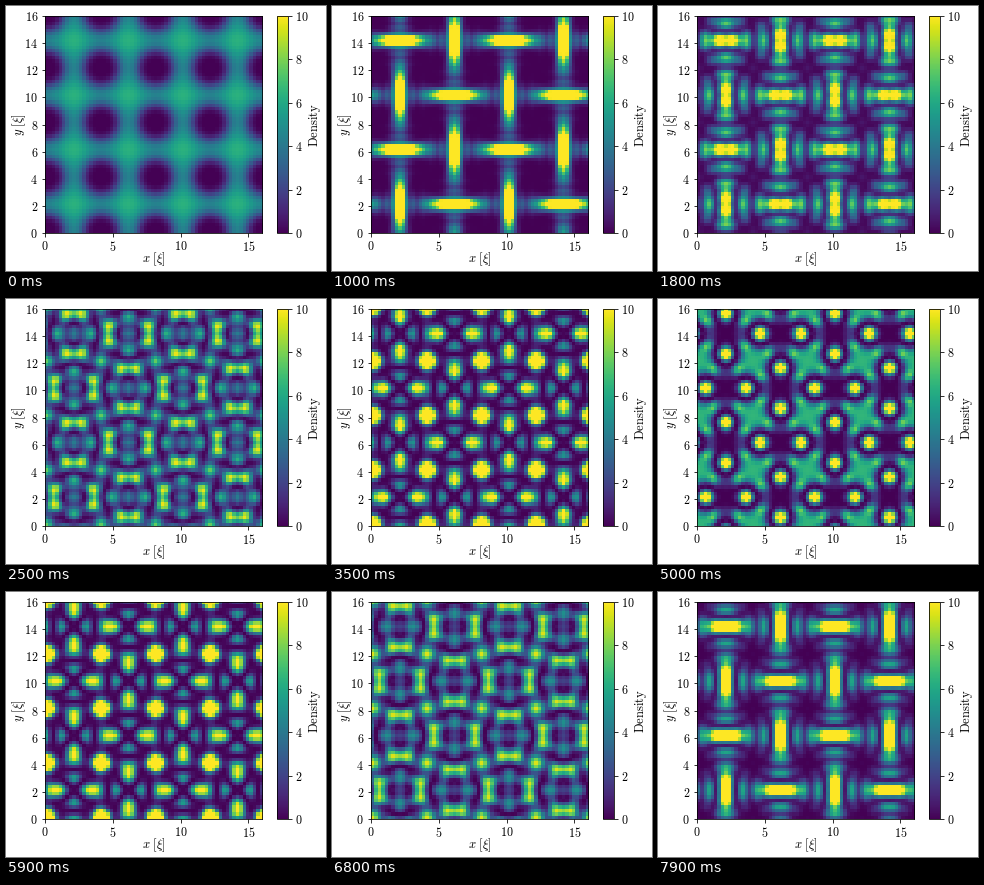
Write a matplotlib script that moves like this. It is 320 px wide and 265 px high and loops after 8000 ms.

```python
import numpy as np
import matplotlib.pyplot as plt
from matplotlib.animation import FuncAnimation

WIDTH, HEIGHT, DPI = 320, 265, 72
FRAMES, INTERVAL = 80, 100
SIZE, CELLS = 16, 64
SPACING, CHARGE = 4, 4
TIME_STEP = 0.0536

plt.rcParams.update({
    "mathtext.fontset": "cm",
    "font.family": "DejaVu Serif",
    "font.size": 12,
})


def vortex_lattice(x, y):
    """Square lattice of alternating, multiply charged vortices."""
    profile = np.ones_like(x)
    sites = np.arange(-SPACING, SIZE + SPACING + 1, SPACING)
    for cx in sites:
        for cy in sites:
            profile *= np.tanh(np.hypot(x - cx, y - cy))
    angle = np.arctan2(np.sin(np.pi * y / SPACING), np.sin(np.pi * x / SPACING))
    return np.sqrt(8) * (profile * np.exp(-1j * angle)) ** CHARGE


coords = np.arange(CELLS) * SIZE / CELLS
psi_k = np.fft.fft2(vortex_lattice(*np.meshgrid(coords, coords)))

k = 2 * np.pi * np.fft.fftfreq(CELLS, SIZE / CELLS)
energy = 0.5 * (k[:, None] ** 2 + k[None, :] ** 2)


def density(frame):
    """Density of the freely evolving wave function."""
    phase = np.exp(-1j * energy * frame * TIME_STEP)
    return np.abs(np.fft.ifft2(psi_k * phase)) ** 2


def pixel_axes(left, top, right, bottom):
    return fig.add_axes([left / WIDTH, 1 - bottom / HEIGHT,
                         (right - left) / WIDTH, (bottom - top) / HEIGHT])


def pixel_text(px, py, text, rotation=0):
    fig.text(px / WIDTH, 1 - py / HEIGHT, text, rotation=rotation,
             size=12.6, ha="center", va="center")


def math_labels(values):
    return [f"${v}$" for v in values]


fig = plt.figure(figsize=((WIDTH + 1e-6) / DPI, (HEIGHT + 1e-6) / DPI),
                 dpi=DPI, facecolor="white")
ax = pixel_axes(39, 10, 256, 227.3)
cax = pixel_axes(271, 10, 282, 227.3)

image = ax.imshow(density(0), origin="lower", extent=(0, SIZE, 0, SIZE),
                  cmap="viridis", vmin=0, vmax=10, aspect="auto",
                  interpolation="nearest")
bar = fig.colorbar(image, cax=cax)

xticks, yticks, levels = range(0, 16, 5), range(0, 17, 2), range(0, 11, 2)
ax.set_xticks(xticks, math_labels(xticks))
ax.set_yticks(yticks, math_labels(yticks))
ax.tick_params(axis="x", pad=3)
bar.set_ticks(list(levels), labels=math_labels(levels))

pixel_text(147.5, 253, r"$x\ [\xi]$")
pixel_text(13.5, 119, r"$y\ [\xi]$", 90)
pixel_text(308.5, 119, r"$\mathrm{Density}$", 90)


def update(frame):
    image.set_data(density(frame))
    return [image]


animation = FuncAnimation(fig, update, frames=FRAMES, interval=INTERVAL,
                          repeat=True, repeat_delay=0)
plt.show()
```
